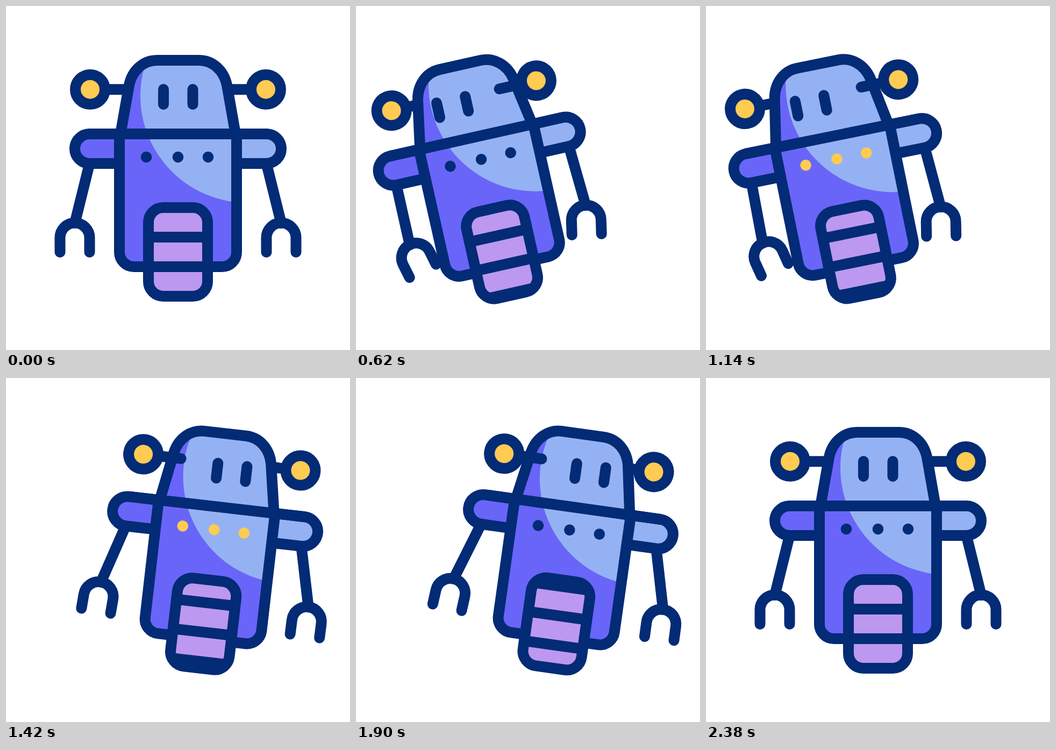
Write an HTML page that moves like this. It is 640 px wide and 640 px high and loops after 2400 ms.

```html
<!DOCTYPE html>
<html lang="en">
<head>
<meta charset="utf-8">
<title>Robot</title>
<style>
  html, body { margin: 0; width: 100%; height: 100%; overflow: hidden; background: #fff; }
  svg { display: block; width: 100%; height: 100%; }
  .line { fill: none; stroke: #032b76; stroke-width: 20; stroke-linecap: round; stroke-linejoin: round; }
  .purple { fill: #6965f8; }
  .light { fill: #94b2f3; }
  .pink { fill: #bc98f0; }
</style>
</head>
<body>
<svg viewBox="0 0 640 640">
  <defs>
    <path id="trunk" d="M211 238V458a27 27 0 0 0 27 27H402a27 27 0 0 0 27-27V238"/>
    <path id="skull" d="M213 238L229 147C235 119 256 101 281 101H359C384 101 405 119 411 147L427 238"/>
    <rect id="tire" x="265" y="375" width="110" height="165" rx="27.5"/>
    <path id="limb" d="M155.5 293L128 404M100.5 458V431a27.5 27.5 0 0 1 55 0V458"/>
    <path id="shoulder" d="M211 238H155.5a27.5 27.5 0 0 0 0 55H211"/>
    <g id="antenna">
      <path class="line" d="M184 155.2H227"/>
      <circle class="line" cx="156.5" cy="155.2" r="27.5" style="fill:#ffcb52"/>
    </g>
    <clipPath id="shell"><use href="#trunk"/><use href="#skull"/></clipPath>
    <clipPath id="tireClip"><use href="#tire"/></clipPath>
  </defs>
  <g id="robot">
    <g id="armL"><use href="#limb" class="line"/></g>
    <g id="armR"><use href="#limb" class="line" transform="matrix(-1 0 0 1 640 0)"/></g>
    <g class="purple"><use href="#shoulder" style="stroke:#032b76;stroke-width:20"/></g>
    <g class="light"><use href="#shoulder" transform="matrix(-1 0 0 1 640 0)" style="stroke:#032b76;stroke-width:20"/></g>
    <g id="back">
      <g id="antL"><use href="#antenna"/></g>
      <g id="antR"><use href="#antenna" transform="matrix(-1 0 0 1 640 0)"/></g>
    </g>
    <g clip-path="url(#shell)">
      <rect class="purple" x="200" y="90" width="240" height="400"/>
      <circle class="light" cx="449" cy="167" r="199"/>
    </g>
    <use href="#skull" class="line"/>
    <use href="#trunk" class="line"/>
    <path class="line" d="M156 238H484"/>
    <g id="front"></g>
    <path id="eyes" class="line" d="M293 155V183M347.5 155V183"/>
    <g id="lamps">
      <circle cx="261" cy="281" r="10.3"/>
      <circle cx="320" cy="281" r="10.3"/>
      <circle cx="376" cy="281" r="10.3"/>
    </g>
    <use href="#tire" class="pink"/>
    <g clip-path="url(#tireClip)">
      <path id="treads" class="line" d="M265 320H375M265 375H375M265 430H375M265 485H375M265 540H375M265 595H375"/>
    </g>
    <use href="#tire" class="line"/>
  </g>
</svg>
<script>
  const LOOP = 2400;
  const T1 = 878, T2 = 1685, T3 = 2370;   // full left, full right, back at rest
  const TREAD_GAP = 55;

  const REST = { x: 0, tilt: 0, armL: 0, armR: 0, eyeX: 0, eyeY: 0, roll: 0 };
  const LEFT = { x: -52.3, tilt: -13.6, armL: -15, armR: 11.5, eyeX: -33.5, eyeY: 5.7, roll: 114.5 };
  const RIGHT = { x: 58, tilt: 8.75, armL: 5.2, armR: -0.5, eyeX: 25.5, eyeY: 2, roll: -26 };
  const END = { ...REST, roll: -4 * TREAD_GAP };

  // antenna offsets at full turn: left x, y, right x, y
  const ANT_LEFT = [22, 1, -34, 5.8];
  const ANT_RIGHT = [25.5, 2.3, -25.5, -3];

  const $ = id => document.getElementById(id);
  const lerp = (a, b, p) => a + (b - a) * p;
  const set = (id, transform) => $(id).setAttribute('transform', transform);
  const shift = (id, x, y) => set(id, `translate(${x} ${y})`);

  // cubic-bezier(.8, 0, .2, 1)
  function ease(x) {
    if (x <= 0) return 0;
    if (x >= 1) return 1;
    let lo = 0, hi = 1, u = 0.5;
    for (let i = 0; i < 24; i++) {
      u = (lo + hi) / 2;
      const v = 1 - u;
      const at = 2.4 * u * v * v + 0.6 * u * u * v + u * u * u;
      if (at < x) lo = u; else hi = u;
    }
    return u * u * (3 - 2 * u);
  }

  function mix(a, b, p) {
    const out = {};
    for (const k in a) out[k] = lerp(a[k], b[k], p);
    return out;
  }

  function poseAt(t) {
    let p, pose, turn;
    if (t < T1) {
      p = ease(t / T1);
      pose = mix(REST, LEFT, p);
      turn = -p;
    } else if (t < T2) {
      p = ease((t - T1) / (T2 - T1));
      pose = mix(LEFT, RIGHT, p);
      const h = 2 * p - 1;
      turn = h * Math.abs(h);
    } else {
      p = ease((t - T2) / (T3 - T2));
      pose = mix(RIGHT, END, p);
      turn = 1 - p;
    }
    pose.turn = turn;
    return pose;
  }

  function layer(id, parent) {
    if ($(id).parentNode !== $(parent)) $(parent).appendChild($(id));
  }

  function draw(t) {
    const s = poseAt(t);
    set('robot', `translate(${s.x} 0) rotate(${s.tilt} 320 457)`);
    set('armL', `rotate(${s.armL} 155.5 293)`);
    set('armR', `rotate(${s.armR} 484.5 293)`);
    shift('eyes', s.eyeX, s.eyeY);

    const amount = Math.abs(s.turn);
    const a = (s.turn < 0 ? ANT_LEFT : ANT_RIGHT).map(v => v * amount);
    shift('antL', a[0], a[1]);
    shift('antR', a[2], a[3]);
    // the antenna on the far side passes behind the head
    layer('antL', s.turn > 0 ? 'front' : 'back');
    layer('antR', s.turn < 0 ? 'front' : 'back');

    shift('treads', 0, s.roll % TREAD_GAP);
    $('lamps').setAttribute('fill', t >= 640 && t < 1660 ? '#ffcb52' : '#032b76');
  }

  const start = performance.now();
  function frame(now) {
    draw(Math.max(0, now - start) % LOOP);
    requestAnimationFrame(frame);
  }
  draw(0);
  requestAnimationFrame(frame);
</script>
</body>
</html>
```
